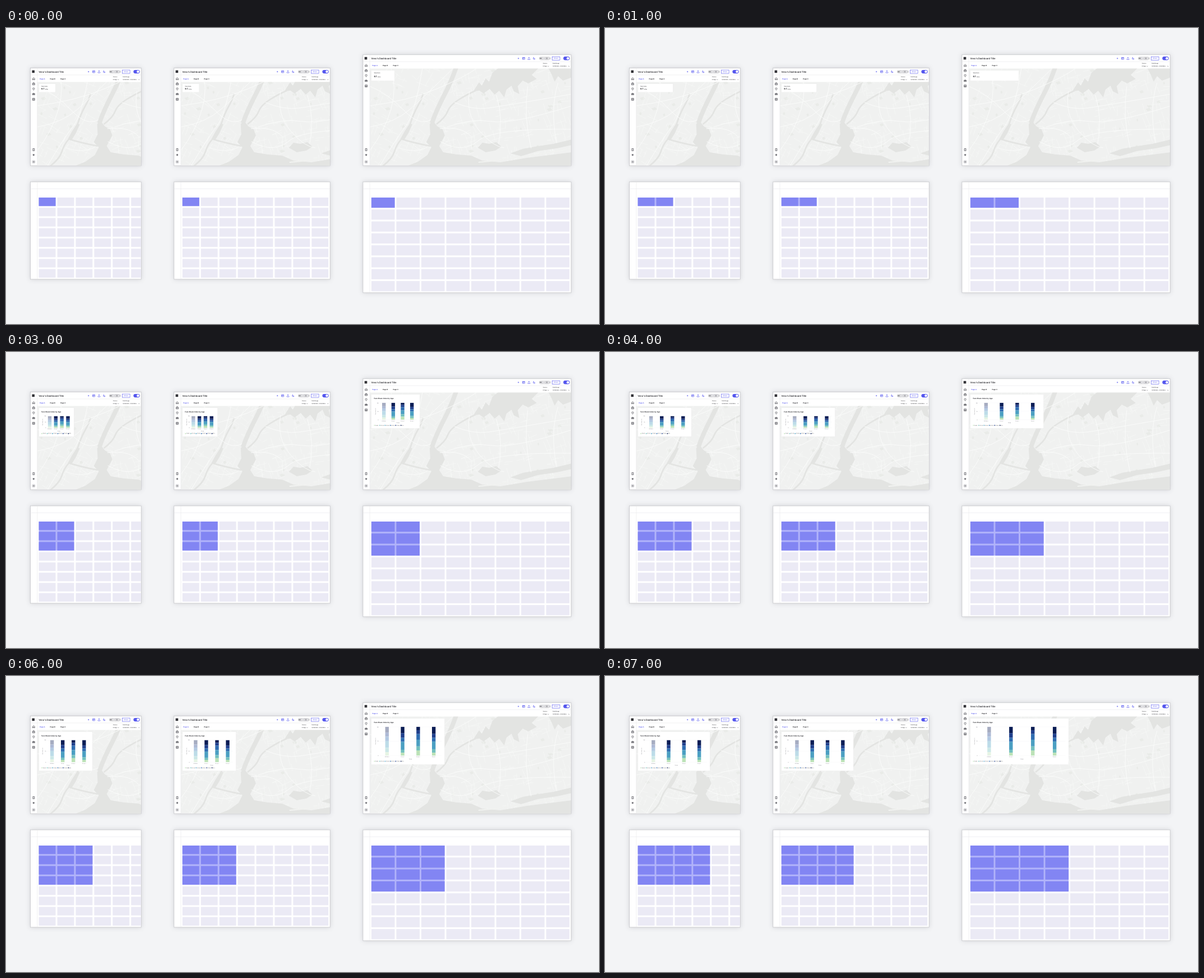
Write an HTML page that moves like this. It is 1058 px wide and 529 px high and loops after 8000 ms.

```html
<!DOCTYPE html>
<html lang="en">
<head>
<meta charset="utf-8">
<title>Responsive dashboard grid</title>
<style>
  html, body { margin: 0; width: 100%; height: 100%; overflow: hidden; background: #f3f4f6; }
  svg { display: block; width: 100vw; height: 100vh; }
  text { font-family: Inter, "Liberation Sans", sans-serif; fill: #1d1d22; text-rendering: geometricPrecision; }
  .panel { fill: #fff; stroke: #bfc0c4; stroke-width: .7; filter: drop-shadow(0 0 4px rgba(40, 40, 50, .16)); }
  .rule { stroke: #e6e6ea; stroke-width: .6; fill: none; }
  .icon { stroke: #45454c; stroke-width: .65; fill: none; }
  .accent { stroke: #5557ee; }
  .card { fill: #fff; filter: drop-shadow(0 0 .6px rgba(0, 0, 0, .14)); }
</style>
</head>
<body>
<svg id="stage" viewBox="0 0 1058 529" preserveAspectRatio="none"></svg>
<script>
const INK = '#1d1d22', BLUE = '#5557ee', CELL = '#ebeaf5', PICKED = '#8285f3', SPAN = '#b1b3fa';
const BOTTOM = 246, GRID_TOP = 275, MAP_ORIGIN = 637;

// One entry per screen size; cell and pitch describe its layout grid.
const panels = [
  { x: 43.6, y: 71.6, right: 241.2, gridEnd: 449, cw: 29.9, ch: 15.2, px: 32.93, py: 18.28 },
  { x: 299.8, y: 71.6, right: 578.2, gridEnd: 449, cw: 29.9, ch: 15.2, px: 32.93, py: 18.28 },
  { x: 636.9, y: 47.8, right: 1008.2, gridEnd: 473, cw: 41.6, ch: 18.2, px: 44.55, py: 21.32 }
];

const steps = [
  { cols: 1, rows: 1, kind: 'visits' },
  { cols: 2, rows: 1, kind: 'visits' },
  { cols: 2, rows: 2, kind: 'residents' },
  { cols: 2, rows: 3, kind: 'chart' },
  { cols: 3, rows: 3, kind: 'chart' },
  { cols: 2, rows: 4, kind: 'chart' },
  { cols: 3, rows: 4, kind: 'chart' },
  { cols: 4, rows: 4, kind: 'chart' }
];

const rect = (x, y, w, h, fill, extra = '') =>
  `<rect x="${x}" y="${y}" width="${w}" height="${h}" fill="${fill}" ${extra}/>`;
const path = (d, extra) => `<path d="${d}" ${extra}/>`;
const circle = (x, y, r, fill, extra = '') => `<circle cx="${x}" cy="${y}" r="${r}" fill="${fill}" ${extra}/>`;
const text = (x, y, size, str, extra = '') => `<text x="${x}" y="${y}" font-size="${size}" ${extra}>${str}</text>`;
const times = (n, fn) => Array.from({ length: n }, (_, i) => fn(i)).join('');

function seeded(seed) {
  return () => (seed = (seed * 16807) % 2147483647) / 2147483647;
}

function cityMap() {
  const rnd = seeded(4217);
  const line = (x, y, angle, len) =>
    `M${x.toFixed(1)} ${y.toFixed(1)}l${(Math.cos(angle) * len).toFixed(1)} ${(Math.sin(angle) * len).toFixed(1)}`;
  const streets = times(420, () => {
    const x = 645 + rnd() * 365, y = 70 + rnd() * 176;
    const tilt = x < 780 ? -1.05 : -.25;
    return line(x, y, tilt + (rnd() < .5 ? 0 : Math.PI / 2) + (rnd() - .5) * .5, 6 + rnd() * 17);
  });
  const parks = times(36, () => {
    const x = 648 + rnd() * 355, y = 72 + rnd() * 165, s = 2 + rnd() * 5;
    return `M${x.toFixed(1)} ${y.toFixed(1)}l${s.toFixed(1)} -2 ${(s / 2).toFixed(1)} 4 -${s.toFixed(1)} 2z`;
  });
  const water = [
    'M715 247L735 239 752 227 759 213 750 204 757 190 756 172 761 165 770 176 779 181 783 192 773 211 780 222 804 226 830 228 850 237 882 240 930 232 1010 222V247Z',
    'M834 113L844 97 849 103 856 90 862 96 868 80 878 72H950L938 84 947 91 932 99 922 94 913 104 916 118 906 113 902 103 893 110 889 124 880 112 872 119 863 109 852 117 845 112Z',
    'M968 72H1010V88L994 94 985 86 979 96 974 84Z',
    'M842 214L850 205 862 207 875 204 884 212 873 219 856 222Z',
    'M900 224L922 216 950 211 977 207 1010 199V209L983 215 949 220 919 229Z',
    'M704 198L711 185 720 171 725 172 718 188 710 201Z'
  ].join('');
  const river = 'M806 62Q797 91 782 120T760 170';
  const creeks = 'M768 172Q784 160 788 149T808 128 838 112M706 198Q697 208 693 221T672 247M721 172Q727 153 735 139T744 117M704 198Q726 205 757 211';
  const highways = 'M649 104Q683 118 710 147T758 164M649 177Q694 169 720 146T796 74M667 247Q697 196 713 176T743 72M649 139Q718 130 768 109T840 72'
    + 'M787 177Q830 161 866 167T1010 139M775 203Q816 225 842 202T1010 181M800 133Q833 147 861 143T1010 118M827 113Q820 155 845 184T889 214'
    + 'M875 120Q888 162 879 207M931 104Q923 157 937 215M774 180Q813 175 830 194M687 72Q698 106 687 145T649 219M700 214Q730 225 752 213M985 98Q971 142 982 205';
  return rect(640, 40, 372, 208, '#f0f1f0')
    + path(parks, 'fill="#e9ebe8"')
    + path(streets, 'fill="none" stroke="#f8f9f8" stroke-width=".55"')
    + path(water, 'fill="#e3e4e2"')
    + path(river, 'fill="none" stroke="#e3e4e2" stroke-width="8"')
    + path(creeks, 'fill="none" stroke="#e3e4e2" stroke-width="2.6"')
    + path(highways, 'fill="none" stroke="#fbfcfb" stroke-width=".9"')
    + path('M843 240Q910 234 1010 215', 'fill="none" stroke="#f1f2f0" stroke-width="2.2"');
}

function sidebar(p) {
  const x = p.x + 5.7, y = p.y + 19;
  const icon = (dy, d) => path(d, `class="icon" transform="translate(${x} ${dy})"`);
  return rect(p.x + 2.8, p.y + 4, 4.6, 4.6, '#333338')
    + icon(y, 'M-2 2V-.3L0-2 2-.3V2H.7V.4H-.7V2Z')
    + icon(y + 9.2, 'M-2-1H2V2H-2ZM-.9-1V-2H.9V-1M-2 .4H2')
    + icon(y + 18.4, 'M0 2.2Q-3.5-2 0-2T0 2.2M-.3-.4H.3')
    + icon(y + 27.6, 'M-2-.8Q0-2.8 2-.8M-2-.8V1.4H-.5V.2H.5V1.4H2V-.8ZM-2-.1H2')
    + icon(y + 36.8, 'M-1.9-1.9H1.9V1.9H-1.9ZM-1.9-.5H1.9M-1.9 .8H1.9')
    + icon(BOTTOM - 28.5, 'M-1.5-2H1.5V2H-1.5ZM-.4-.7H.5M-.4 .6H.5')
    + icon(BOTTOM - 19.2, 'M-1.3-1.3L1.3 1.3M1.3-1.3L-1.3 1.3M-1.8 0H1.8M0-1.8V1.8')
    + circle(x, BOTTOM - 6.8, 3.1, '#d9d9dc')
    + text(x, BOTTOM - 6.1, 1.9, 'NB', 'text-anchor="middle" font-weight="600"');
}

function header(p) {
  const { x, y, right: r } = p;
  const tool = (dx, d) => path(d, `class="icon accent" transform="translate(${r - dx} ${y + 6.5})"`);
  const chevron = (cx) => path(`M${cx - .7} ${y + 20.2}l.7 .7 .7-.7`, 'class="icon" stroke-width=".4"');
  const tabs = ['A', 'B', 'C'].map((name, i) =>
    text(x + 16.5 + i * 18.5, y + 20.5, 2.8, 'Page ' + name, `font-weight="600" ${i ? '' : `style="fill:${BLUE}"`}`)).join('');
  return text(x + 14.7, y + 8.2, 4.3, "Veno's Dashboard Title", 'font-weight="500" letter-spacing="-.14"')
    + tabs
    + tool(94, 'M-1.2 0H1.2M0-1.2V1.2')
    + tool(84.6, 'M-2-1.8H2V1.8H-2ZM-2-.6H2M-.6-.6V1.8')
    + tool(75.2, 'M0 1V-2M-1.2-.9L0-2.1 1.2-.9M-2 .7V2H2V.7')
    + tool(66, 'M-.7-1.9Q-1 1.3 1.9 .9Q.6 2.3-1 1.5T-.7-1.9')
    + rect(r - 57.2, y + 3.5, 20.3, 6.1, '#d9d9dc', 'rx="3.05"')
    + times(3, i => circle(r - 48.4 + i * 5, y + 6.5, 2.5, i % 2 ? '#cfcfd3' : '#e4e4e7'))
    + text(r - 55.6, y + 7.3, 2.1, 'NB', 'font-weight="700"')
    + text(r - 48.4, y + 7.3, 2, 'J', 'text-anchor="middle"')
    + text(r - 43.4, y + 7.3, 2, 'S', 'text-anchor="middle" font-weight="700"')
    + text(r - 38.4, y + 7.3, 2, '4', 'text-anchor="middle"')
    + rect(r - 33.6, y + 3.5, 13.5, 6, '#fff', `stroke="${BLUE}" stroke-width=".6"`)
    + text(r - 26.9, y + 7.4, 2.6, 'Share', `text-anchor="middle" style="fill:${BLUE}"`)
    + rect(r - 13.8, y + 3.3, 11.3, 6.3, BLUE, 'rx="3.15"')
    + circle(r - 5.7, y + 6.45, 2.3, '#fff')
    + text(r - 50.4, y + 16.2, 2.2, 'Column')
    + text(r - 50.4, y + 21.3, 2.4, '3 Days') + chevron(r - 40.6)
    + text(r - 33, y + 16.2, 2.2, 'Date Range')
    + text(r - 33, y + 21.3, 2.25, '01/01/2050 - 01/31/2053', 'letter-spacing="-.06"') + chevron(r - 3.9);
}

function dashboard(p, i) {
  const { x, y } = p, w = p.right - x, mapX = x + 12.2, mapY = y + 24.8;
  return `<clipPath id="map${i}">${rect(mapX, mapY, p.right - mapX - .3, BOTTOM - mapY - .3, '#000')}</clipPath>`
    + rect(x, y, w, BOTTOM - y, '#fff', 'class="panel"')
    + `<g clip-path="url(#map${i})"><use href="#city" x="${x - MAP_ORIGIN}"/></g>`
    + path(`M${x} ${y + 12.3}H${p.right}M${mapX} ${y}V${BOTTOM}`, 'class="rule"')
    + sidebar(p) + header(p);
}

function layoutGrid(p, i) {
  const { x } = p, w = p.right - x, h = p.gridEnd - GRID_TOP;
  const cells = times(64, n => rect(x + 15 + n % 8 * p.px, GRID_TOP + 28 + (n >> 3) * p.py, p.cw, p.ch, CELL));
  return `<clipPath id="grid${i}">${rect(x, GRID_TOP, w - .3, h, '#000')}</clipPath>`
    + rect(x, GRID_TOP, w, h, '#fff', 'class="panel"')
    + path(`M${x + 12.2} ${GRID_TOP}V${p.gridEnd}M${x} ${GRID_TOP + 12.3}H${p.right}`, 'class="rule"')
    + `<g clip-path="url(#grid${i})">${cells}</g>`;
}

// Bands run from the oldest group at the top to the youngest at the bottom.
const bands = ['#0b1d55', '#1f3f8c', '#2f6db1', '#4b9fc2', '#73c0bd', '#bce2b7'];
const shares = [
  [.2, .14, .15, .24, .15, .12],
  [.22, .16, .14, .28, .1, .1],
  [.12, .13, .2, .23, .14, .18],
  [.24, .14, .13, .27, .12, .1]
];
const ages = ['18-24', '25-34', '35-44', '45-54', '55-64', '65+'];
const groups = ['All Riders', 'Group 1', 'Group 2', 'Group 3'];

function chart(x, y, w, h) {
  const left = x + 14, plotW = w - 19.5, top = y + 15.1, base = y + h - 15.7, plotH = base - top;
  const mid = 'text-anchor="middle" style="fill:#66666e"';
  const bar = n => {
    const cx = left + plotW * (n + .5) / 4;
    let at = top;
    const parts = bands.map((color, k) => {
      const bh = plotH * shares[n][k], out = rect(cx - 3.2, at, 6.4, bh, color);
      at += bh;
      return out + path(`M${cx - 3.2} ${at}h6.4`, 'stroke="#fff" stroke-width=".12"');
    }).join('');
    return `<g opacity="${n ? 1 : .36}">${parts}</g>` + text(cx, base + 2.7, 1.7, groups[n], mid);
  };
  const grid = times(3, k => {
    const gy = top + plotH * k / 2;
    return path(`M${left} ${gy}h${plotW}`, 'stroke="#ececf0" stroke-width=".3"')
      + text(left - 1.2, gy + .6, 1.7, 100 - 50 * k, 'text-anchor="end" style="fill:#66666e"');
  });
  const legend = times(6, k => {
    const lx = x + 5.5 + k * 9.45, ly = y + h - 5.6;
    return circle(lx, ly, .9, bands[5 - k]) + text(lx + 1.6, ly + .7, 1.9, ages[k]);
  });
  return text(x + 4.5, y + 7.9, 3, 'Fare Share Index by Age', 'font-weight="600"')
    + grid + times(4, bar)
    + text(left + plotW / 2, base + 6.5, 1.8, 'Group', mid)
    + text(0, 0, 1.7, 'Fare Share (%)', `${mid} transform="translate(${x + 7.8} ${top + plotH / 2}) rotate(-90)"`)
    + legend;
}

function visits(x, y, h) {
  const shift = (h - 15.2) / 2;
  return text(x + 4.5, y + 5.4, 2.15, 'Total Visits', 'font-weight="500"')
    + text(x + 4.5, y + 10.3 + shift, 3.7, '9.7', 'font-weight="700" letter-spacing="-.1"')
    + text(x + 10.8, y + 10.2 + shift, 1.9, 'million', 'font-weight="500"');
}

function residents(x, y, h) {
  const cy = y + h / 2;
  return text(x + 4.5, cy - 5.8, 2.95, 'Total Residents', 'font-weight="600"')
    + text(x + 4.2, cy + 6.8, 9.6, '150,000', 'font-weight="500" letter-spacing="-.2"')
    + text(x + 39.5, cy + 8.4, 2.7, 'people', 'font-weight="500"');
}

function content(step, p) {
  const { cols, rows, kind } = step;
  const x = p.x + 15, y = p.y + 28, gy = GRID_TOP + 28;
  const w = (cols - 1) * p.px + p.cw, h = (rows - 1) * p.py + p.ch;
  const body = kind === 'chart' ? chart(x, y, w, h) : kind === 'visits' ? visits(x, y, h) : residents(x, y, h);
  return rect(x, y, w, h, '#fff', 'class="card"') + body
    + rect(x, gy, w, h, SPAN)
    + times(cols * rows, n => rect(x + n % cols * p.px, gy + Math.floor(n / cols) * p.py, p.cw, p.ch, PICKED));
}

const stage = document.getElementById('stage');
stage.innerHTML = `<defs><g id="city">${cityMap()}</g></defs>`
  + rect(0, 0, 1058, 529, '#f3f4f6')
  + panels.map((p, i) => dashboard(p, i) + layoutGrid(p, i)).join('')
  + '<g id="live"></g>';
const live = document.getElementById('live');

let shown = -1;
const start = performance.now();
function draw(now) {
  const index = Math.floor(Math.max(0, now - start) % 8000 / 1000);
  if (index !== shown) {
    shown = index;
    live.innerHTML = panels.map(p => content(steps[index], p)).join('');
  }
  requestAnimationFrame(draw);
}
draw(start);
</script>
</body>
</html>
```
